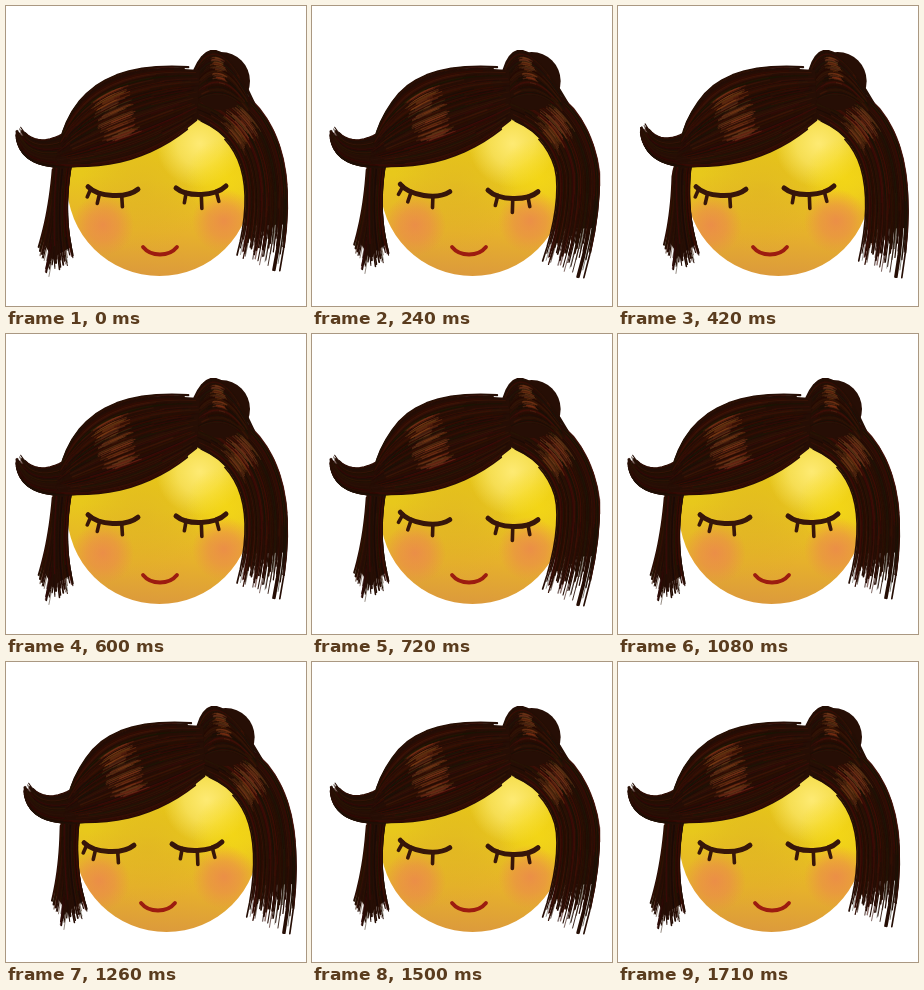
Animation, 300 px wide and 300 px high, one loop 1.74 s. Source, as an HTML page with a canvas:

```html
<!DOCTYPE html>
<html lang="en">
<head>
<meta charset="utf-8">
<title>Nodding face</title>
<style>
html, body { margin: 0; width: 100%; height: 100%; overflow: hidden; background: #fff; }
canvas { display: block; }
</style>
</head>
<body>
<canvas id="stage" width="300" height="300"></canvas>
<script>
const g = document.getElementById('stage').getContext('2d');
const SWING = 580, TICK = 30;

const clamp = v => Math.max(0, Math.min(1, v));
const mix = (a, b, u) => a + (b - a) * u;
const mixPoint = (p, q, u) => [mix(p[0], q[0], u), mix(p[1], q[1], u)];

let seed, head, tilt, flip, turn;
function rnd(lo = 0, hi = 1) {
  seed = (seed * 16807) % 2147483647;
  return mix(lo, hi, seed / 2147483647);
}

// The head leans over, tilts the face for the middle of the swing and comes back.
function setPose(phase) {
  const away = Math.abs(phase - 265);
  head = clamp((235 - away) / 65);
  tilt = clamp((145 - away) / 18);
  flip = Math.exp(-(((phase - 395) / 30) ** 2));
  turn = mix(-4 * head, 6, tilt);
}

// Carries a resting hair point to the current pose.
function warp([x, y]) {
  const left = x < 150;
  const hang = head * clamp((y - 165) / 100);
  const curl = y < 165 ? flip * clamp((62 - x) / 48) : 0;
  const sway = left ? mix(7, 2, tilt) : mix(2, -10, tilt);
  return [
    x + 8 * head * clamp((y - 40) / 60) + hang * sway + 9 * curl,
    y + (left ? -3 : 7) * hang - 7 * curl
  ];
}

// Points along the part from..to of a quadratic curve.
function curve([a, c, b], from, to) {
  return Array.from({ length: 13 }, (_, i) => {
    const t = mix(from, to, i / 12);
    return warp(mixPoint(mixPoint(a, c, t), mixPoint(c, b, t), t));
  });
}

function trace(points) {
  g.beginPath();
  points.forEach(p => g.lineTo(...p));
}

const brown = () => `rgba(${rnd(18, 74) | 0},${rnd(8, 26) | 0},${rnd(3, 10) | 0},.6)`;
const copper = () => `rgba(${rnd(96, 140) | 0},${rnd(46, 70) | 0},${rnd(18, 36) | 0},${rnd(.25, .6)})`;

// Brush hairs between two guide curves, with loose edges and ragged ends.
function tress(one, two, count, shine) {
  const between = u => one.map((p, i) => mixPoint(p, two[i], u));
  const hair = (u, from, to, color, width) => {
    trace(curve(between(u), from, to));
    g.strokeStyle = color;
    g.lineWidth = width;
    g.stroke();
  };
  trace([...curve(one, 0, .85), ...curve(two, 0, .85).reverse()]);
  g.fillStyle = '#260e05';
  g.fill();
  for (let i = 0; i < count; i++) hair(rnd(-.04, 1.04), rnd(0, .3), rnd(.84, 1), '#260e05', rnd(.8, 2.4));
  for (let i = 0; i < count; i++) hair(rnd(-.03, 1.03), rnd(0, .3), rnd(.7, 1), brown(), rnd(.6, 1.5));
  if (!shine) return;
  for (let i = 0; i < count * .7; i++) {
    hair(rnd(.12, .75), shine + rnd(-.12, 0), shine + rnd(.03, .16), copper(), rnd(.7, 1.5));
  }
}

function glow(x, y, r, rgb, alpha) {
  const f = g.createRadialGradient(x, y, 0, x, y, r);
  f.addColorStop(0, `rgba(${rgb},${alpha})`);
  f.addColorStop(.5, `rgba(${rgb},${alpha * .65})`);
  f.addColorStop(1, `rgba(${rgb},0)`);
  g.fillStyle = f;
  g.fillRect(x - r, y - r, 2 * r, 2 * r);
}

function eye(x, y, angle, lashes) {
  g.save();
  g.translate(x, y);
  g.rotate(angle);
  g.strokeStyle = '#37160a';
  g.lineWidth = 5;
  g.beginPath();
  g.moveTo(-25, 0);
  g.bezierCurveTo(-14, 10, 14, 10, 25, 0);
  g.stroke();
  g.lineWidth = 3.6;
  for (const at of lashes) {
    const top = 7.5 * (1 - (at / 25) ** 2);
    g.beginPath();
    g.moveTo(at, top);
    g.lineTo(at * 1.15, top + 14 - Math.abs(at) / 4);
    g.stroke();
  }
  g.restore();
}

function face() {
  const x = 153.5 + 7 * head, y = 177.5;
  g.save();
  g.beginPath();
  g.arc(x, y, 92.5, 0, 7);
  g.clip();
  const skin = g.createLinearGradient(x, 95, x - 12, 270);
  skin.addColorStop(0, '#e8cc0e');
  skin.addColorStop(.45, '#e8c81c');
  skin.addColorStop(.75, '#e6b02c');
  skin.addColorStop(1, '#dc9a3c');
  g.fillStyle = skin;
  g.fillRect(0, 0, 300, 300);
  glow(x - 18, y + 8, 62, '222,176,36', .55);
  glow(x + 40, y - 40, 44, '255,236,120', .95);
  glow(x + 66, y - 5, 40, '250,222,20', .6);
  glow(97 + turn, 219, 31, '236,136,76', .85);
  glow(218, 215, 32, '236,136,76', .85);
  g.restore();

  eye(107 + turn, 182, .05 + .1 * tilt, [-22, -13, 9]);
  eye(195 + turn, 181 + 4 * tilt, -.04 + .07 * tilt, [-15, 0, 15]);
  const mouth = 154 + turn / 2;
  g.strokeStyle = '#9c1c10';
  g.lineWidth = 3.8;
  g.beginPath();
  g.moveTo(mouth - 17, 241);
  g.bezierCurveTo(mouth - 9, 251, mouth + 9, 251, mouth + 17, 241);
  g.stroke();
}

function bun() {
  g.beginPath();
  g.ellipse(...warp([215, 75]), 29, 29, 0, 0, 7);
  g.fillStyle = '#260e05';
  g.fill();
  tress([[185, 74], [208, 8], [248, 98]], [[190, 94], [220, 76], [242, 106]], 45, .45);
}

function hair() {
  // side locks
  tress([[48, 140], [46, 200], [31, 246]], [[60, 140], [56, 205], [43, 274]], 16);
  tress([[50, 140], [44, 215], [48, 268]], [[70, 140], [54, 205], [70, 256]], 16);
  tress([[188, 112], [262, 138], [232, 252]], [[190, 65], [307, 97], [273, 266]], 80, .3);
  bun();
  // curl at the temple, then the fringe over it
  tress([[75, 116], [32, 150], [14, 120]], [[90, 157], [10, 172], [10, 124]], 26);
  tress([[194, 64], [78, 53], [54, 136]], [[191, 113], [130, 164], [48, 158]], 110, .5);
}

function draw(now) {
  setPose(Math.floor(now % (SWING * 3) / TICK) * TICK % SWING);
  seed = 4711;
  g.lineCap = g.lineJoin = 'round';
  g.fillStyle = '#fff';
  g.fillRect(0, 0, 300, 300);
  face();
  hair();
}

const start = performance.now();
function loop() {
  draw(performance.now() - start);
  requestAnimationFrame(loop);
}
loop();
</script>
</body>
</html>
```
